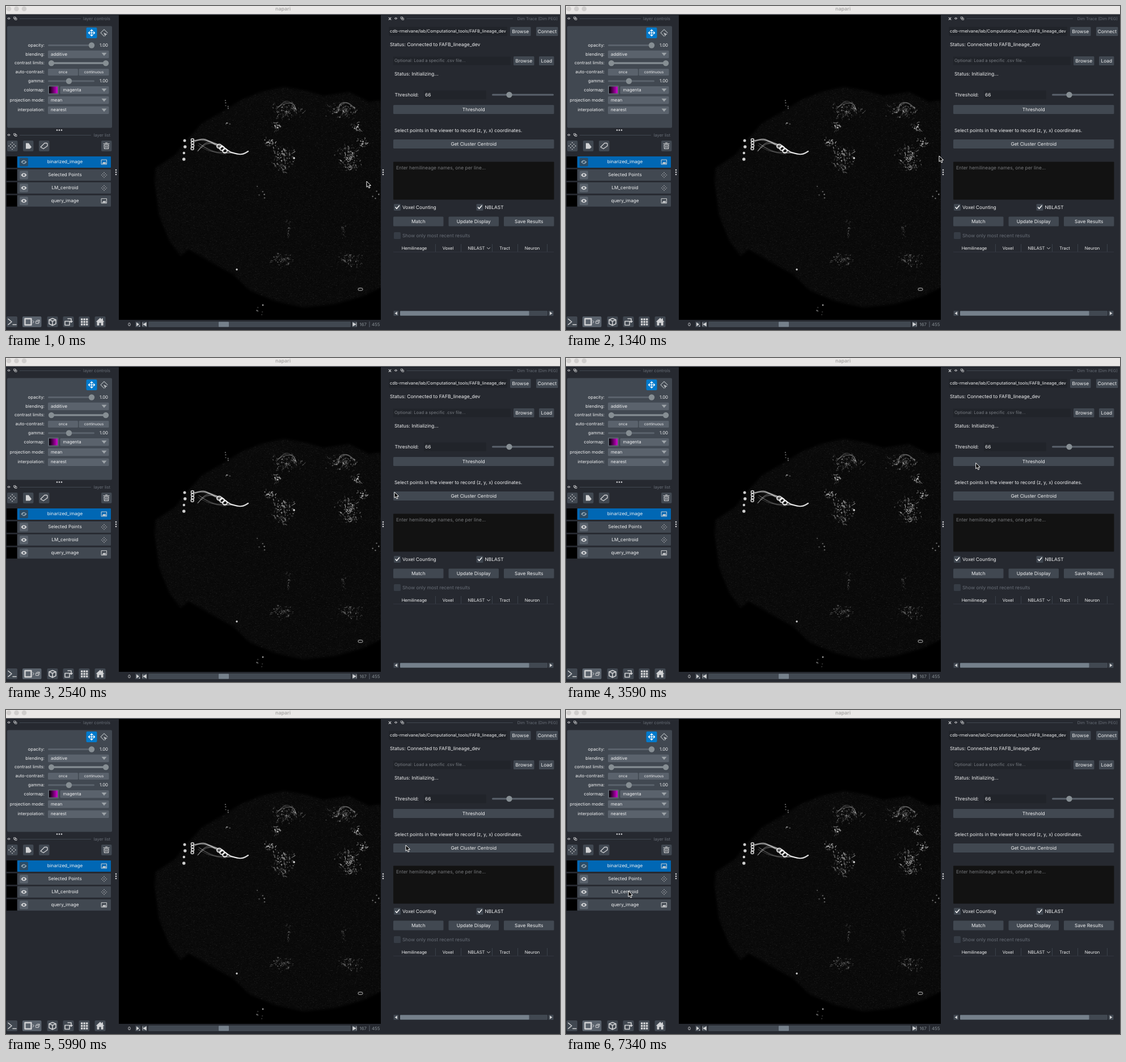
These frames come from a looping animation (977x573 px, 8 s). An HTML page with a canvas:

```html
<!DOCTYPE html>
<html lang="en">
<head>
<meta charset="utf-8">
<title>napari</title>
<style>
html, body { margin: 0; width: 100%; height: 100%; overflow: hidden; background: #262930; }
canvas { display: block; }
</style>
</head>
<body>
<canvas id="stage" width="977" height="573"></canvas>
<script>
const W = 977, H = 573, LOOP = 8000, STEP = 150;
const BG = '#262930', PANEL = '#414851', CONTROL = '#5a626c', KNOB = '#868e93', HANDLE = '#75808b';
const TEXT = '#f0f1f2', DIM = '#686e77', BLUE = '#007acc', ICON = '#d1d2d4', FIELD = '#21242a';

const view = document.getElementById('stage').getContext('2d');
const scene = document.createElement('canvas');
scene.width = W;
scene.height = H;
const c = scene.getContext('2d');

let seed = 7;
const random = () => (seed = (seed * 16807) % 2147483647) / 2147483647;
const spread = size => (random() + random() - 1) * size;
const white = alpha => `rgba(255,255,255,${alpha})`;

function rect(x, y, w, h, color, r = 0) {
  c.fillStyle = color;
  c.beginPath();
  c.roundRect(x, y, w, h, r);
  c.fill();
}

function disc(x, y, r, color) {
  c.fillStyle = color;
  c.beginPath();
  c.arc(x, y, r, 0, 7);
  c.fill();
}

function ring(x, y, rx, ry, color, width = 1) {
  c.strokeStyle = color;
  c.lineWidth = width;
  c.beginPath();
  c.ellipse(x, y, rx, ry, 0, 0, 7);
  c.stroke();
}

function shape(d, x, y, { fill, stroke, width = 1 }) {
  const path = new Path2D(d);
  c.save();
  c.translate(x, y);
  c.lineCap = c.lineJoin = 'round';
  if (fill) { c.fillStyle = fill; c.fill(path); }
  if (stroke) { c.strokeStyle = stroke; c.lineWidth = width; c.stroke(path); }
  c.restore();
}

function text(str, x, y, { size = 8.4, color = TEXT, align = 'left', weight = 400 } = {}) {
  c.font = `${weight} ${size}px Inter, "Liberation Sans", sans-serif`;
  c.textRendering = 'geometricPrecision';
  c.textBaseline = 'middle';
  c.textAlign = align;
  c.fillStyle = color;
  c.fillText(str, x, y);
}

function button(label, x, y, w, h = 16, size = 8.4, color = PANEL) {
  rect(x, y, w, h, color, 1.5);
  text(label, x + w / 2, y + h / 2, { size, align: 'center' });
}

function slider(x, y, w, ...knobs) {
  rect(x, y - 1.5, w, 3, CONTROL, 1.5);
  for (const k of knobs) disc(k, y, 5.2, KNOB);
}

function combo(label, x, y) {
  rect(x, y - 6.5, 181.5 - x, 13.5, CONTROL, 1.5);
  text(label, x + 5, y, { size: 7.8 });
  shape('M-4.5-2.5H4.5L0 3Z', 173, y, { fill: '#9da3a8' });
}

function eye(x, y, size, color, pupil) {
  shape(`M${-size} 0Q0 ${-size * 1.3} ${size} 0Q0 ${size * 1.3} ${-size} 0Z`, x, y, { fill: color });
  disc(x, y, size * .35, pupil);
}

function dockTitle(label, x, y, right, lineEnd, size) {
  eye(x, y, 2.6, ICON, BG);
  shape('M-2-2H1V1H-2ZM0 0H3V3H0Z', x + 11, y - .5, { stroke: ICON, width: .8 });
  rect(x + 19, y, lineEnd - x - 19, 1, PANEL);
  text(label, right, y + .5, { size, color: DIM, align: 'right' });
}

function pointsIcon(x, y, s) {
  disc(x, y, s * .17, ICON);
  for (let i = 0; i < 8; i++) {
    const a = i * Math.PI / 4, r = s * (i % 2 ? .75 : 1.05);
    disc(x + Math.cos(a) * r, y + Math.sin(a) * r, s * .16, ICON);
  }
}

function imageIcon(x, y) {
  shape('M-4.5-4H4.5V4H-4.5Z', x, y, { stroke: ICON });
  shape('M-3.5 3L-1-.5L.5 1L2-1L3.5 3Z', x, y, { fill: ICON });
}

function dots(x, y, dx, dy) {
  for (let i = -1; i < 2; i++) disc(x + i * dx, y + i * dy, 1.3, ICON);
}

// Smooth line through points, drawn several times with random offsets.
function fiber(points, alpha, width = 1, strands = 1, jitter = 0) {
  c.lineCap = 'round';
  c.lineWidth = width;
  c.strokeStyle = white(alpha);
  for (let n = 0; n < strands; n++) {
    const p = points.map(([x, y]) => [x + spread(jitter), y + spread(jitter)]);
    c.beginPath();
    c.moveTo(...p[0]);
    for (let i = 1; i < p.length - 1; i++)
      c.quadraticCurveTo(...p[i], (p[i][0] + p[i + 1][0]) / 2, (p[i][1] + p[i + 1][1]) / 2);
    c.lineTo(...p.at(-1));
    c.stroke();
  }
}

// Cloud of short branches and boutons, densest in the middle.
function tangle(x, y, rx, ry, alpha) {
  for (let i = 0; i < rx * ry * .3 + 8; i++) {
    const px = x + spread(rx * 1.2), py = y + spread(ry * 1.2);
    const hop = () => [px + spread(4), py + spread(4)];
    const glow = alpha * (.15 + random() ** 2 * .85);
    if (random() < .5) fiber([hop(), [px, py], hop()], glow, .6 + random() * .8);
    else disc(px, py, .5 + random() * .9, white(glow));
  }
}

function tissue() {
  const outline = new Path2D('M672 165L640 170L605 152L560 159L530 150L490 143L450 152L415 166L380 188' +
    'L345 208L318 238L298 264L264 286L262 310L270 370L288 415L308 442L322 430L365 455L400 474L430 503' +
    'L475 522L525 533L580 527L630 513L672 492Z');
  c.filter = 'blur(2px)';
  c.fillStyle = '#0a0a0a';
  c.fill(outline);
  c.filter = 'none';
  c.save();
  c.clip(outline);
  for (let i = 0; i < 26000; i++) {
    c.fillStyle = random() < .5 ? white(.035) : 'rgba(0,0,0,.4)';
    c.fillRect(260 + Math.floor(random() * 402), 142 + Math.floor(random() * 392), 1 + random(), 1);
  }
  c.restore();
}

function cellCluster() {
  for (let i = 0; i < 4; i++) {
    disc(315 + spread(2), 238 + i * 11, 2 + random(), white(.8));
    ring(329 + spread(1.5), 237 + i * 5, 2.4, 2.4, white(.75), 1.8);
  }
  fiber([[331, 238], [345, 235], [358, 239], [368, 242], [380, 250]], .35, 1.4, 4, 3);
  fiber([[340, 257], [347, 247], [358, 241], [370, 245]], .25, 1.1, 3, 3);
  fiber([[340, 244], [355, 253], [372, 258], [388, 260]], .2, 1.1, 3, 3);
  for (let i = 0; i < 3; i++) ring(376 + i * 5, 248 + i * 4, 4, 3.5, white(.8), 2.2);
  fiber([[381, 247], [392, 257], [404, 261], [417, 263], [427, 257]], .85, 2.2);
  fiber([[384, 260], [398, 259], [408, 262]], .6, 1.5);
}

function brain() {
  c.save();
  c.beginPath();
  c.rect(199, 16, 462, 539);
  c.clip();
  tissue();
  cellCluster();
  // Arbors mirrored about the midline.
  for (const side of [-1, 1]) {
    const at = (dx, ...rest) => tangle(547 + side * dx, ...rest);
    fiber([[69, 181], [60, 171], [48, 169], [38, 175], [36, 186]].map(([dx, y]) => [547 + side * dx, y]), .25, 1, 3, 4);
    at(48, 184, 27, 15, .4);
    at(71, 213, 8, 9, .8);
    at(82, 242, 9, 8, .75);
    at(57, 264, 20, 17, .55);
    at(60, 284, 14, 9, .4);
    at(48, 396, 3, 16, .3);
    at(61, 449, 20, 13, .35);
  }
  disc(508, 269, 1.7, white(.9));
  disc(407, 466, 1.7, white(.8));
  disc(453, 529, 1.4, white(.6));
  ring(625, 501, 4, 2.2, white(.5), 1.4);
  for (const [x, y] of [[390, 210], [451, 328], [653, 335], [390, 175], [447, 540]])
    for (let i = 0; i < 5; i++) disc(x + spread(9), y + spread(14), 1.2, white(.15 + random() * .3));
  c.restore();
}

function layerControls() {
  dockTitle('layer controls', 5, 22, 184, 132, 7.5);
  rect(2, 35.5, 185, 180, PANEL, 2);
  rect(141.5, 38, 19, 19, BLUE, 2);
  shape('M-5.5 0H5.5M0-5.5V5.5M-3.5-2L-5.5 0L-3.5 2M3.5-2L5.5 0L3.5 2M-2-3.5L0-5.5L2-3.5M-2 3.5L0 5.5L2 3.5',
    151, 47.5, { stroke: '#fff', width: 1.2 });
  shape('M-6 0L0-6L6 0M-6 0L0 6', 173, 47.5, { stroke: '#9da3a8', width: 1.2 });
  shape('M0 0L7 3L4 4L3 7Z', 172, 47, { fill: '#b5b9bd' });

  // The last rows stand slightly further apart.
  const rowY = i => 69.5 + 15.8 * i + Math.max(0, i - 5) * 2;
  ['opacity', 'blending', 'contrast limits', 'auto-contrast', 'gamma', 'colormap', 'projection mode', 'interpolation']
    .forEach((name, i) => text(name + ':', 68, rowY(i), { size: 7.7, align: 'right' }));
  slider(74, rowY(0), 82, 151);
  combo('additive', 74, rowY(1));
  slider(75, rowY(2), 106, 80, 176);
  rect(85, rowY(2) - 1.5, 86, 3, KNOB);
  button('once', 74, rowY(3) - 6, 53, 12, 6.6, CONTROL);
  button('continuous', 128.5, rowY(3) - 6, 53, 12, 6.6, CONTROL);
  slider(74, rowY(4), 82, 111);
  for (const i of [0, 4]) text('1.00', 180, rowY(i), { size: 7.8, align: 'right' });
  const magenta = c.createLinearGradient(76, 0, 91, 0);
  magenta.addColorStop(0, '#000');
  magenta.addColorStop(1, '#d400d4');
  rect(74, rowY(5) - 8, 19, 16, CONTROL, 1.5);
  rect(76, rowY(5) - 6, 15, 12, magenta);
  combo('magenta', 95.5, rowY(5));
  combo('mean', 74, rowY(6));
  combo('nearest', 74, rowY(7));
  dots(94, 219.5, 4, 0);
}

function layerList() {
  dockTitle('layer list', 5, 228, 184, 150, 7.5);
  for (const x of [2, 30, 58, 168]) rect(x, 238, 18.5, 19, PANEL, 2);
  pointsIcon(11, 247.5, 5.5);
  shape('M-4-5L1-5L6 2L3 5L-4 5Z', 39, 247.5, { fill: ICON });
  shape('M-6 2L1-5L5-5L6-4V0L-1 5Z', 67, 247.5, { stroke: ICON, width: 1.3 });
  shape('M-5-4H5M-1.5-5.5H1.5M-4-2L-3.5 5H3.5L4-2ZM-1.3 0V3M1.3 0V3', 177, 247.5, { stroke: ICON, width: 1.2 });

  ['binarized_image', 'Selected Points', 'LM_centroid', 'query_image'].forEach((name, i) => {
    const y = 266 + i * 22.9, mid = y + 10, active = i === 0;
    const box = active ? '#2b4c66' : CONTROL;
    rect(1, y, 18.5, 20, '#000');
    rect(20, y, 165, 20, active ? '#0067b4' : PANEL, 1);
    rect(24, mid - 7.5, 15, 15, box, 2);
    eye(31.5, mid, 5.2, active ? '#8a9eac' : ICON, box);
    if (active) shape('M-4 3L4-3', 31.5, mid, { stroke: box });
    text(name, 104, mid, { size: 8.1, align: 'center' });
    if (i % 3) pointsIcon(173, mid, 4.2);
    else imageIcon(173, mid);
  });
  dots(194, 294, 0, 4);
}

function bottomBar() {
  for (const x of [1, 72.5, 100.5, 128.5, 156.5]) rect(x, 549, 19, 19, PANEL, 2);
  rect(29, 549, 33.5, 19, CONTROL, 2);
  const icon = (d, x, width = 1.6) => shape(d, x, 558.5, { stroke: ICON, width });
  icon('M-7-5L-1 0L-7 5M1 5H7', 11);
  icon('M-5.5-5.5H5.5V5.5H-5.5Z', 39, 2.4);
  icon('M-1.2-2L1 0L-1.2 2', 48.5, 1);
  icon('M-3-1H1V3H-3ZM-3-1L-1-3H3V1L1 3M1-1L3-3', 56, .9);
  icon('M0-6L6-3.5V3.5L0 6.5L-6 3.5V-3.5ZM-6-3.5L0-1L6-3.5M0-1V6', 82);
  icon('M-6-1H2V6H-6ZM-1-5.5H5V1M3-1L5 1L7-1', 110);
  for (let i = 0; i < 9; i++) rect(132 + i % 3 * 4.5, 552.5 + Math.floor(i / 3) * 4.5, 3.4, 3.4, ICON);
  shape('M-7.5 0L0-7L3-4.2V-6H5V-2.3L7.5 0H5.5V6.5H1.6V2H-1.6V6.5H-5.5V0Z', 166, 558.5, { fill: ICON });

  text('0', 217.5, 563.5, { size: 7.8, align: 'center' });
  for (const x of [228, 240, 610]) rect(x, 558, 9, 10, PANEL);
  shape('M-2-3.5L3 0L-2 3.5Z', 232, 563, { fill: ICON });
  disc(235.5, 566, 1, ICON);
  for (const [x, side] of [[244, 1], [615, -1]])
    shape(`M${-3 * side}-3V3M${3 * side}-3L${-2 * side} 0L${3 * side} 3Z`, x, 563, { fill: ICON, stroke: ICON, width: .8 });
  rect(251, 558, 357, 10, PANEL, 1);
  rect(375, 558.5, 18, 9, HANDLE, 1);
  text('167', 636, 563.5, { size: 7.8, color: KNOB, align: 'right' });
  rect(640.5, 558, 1, 10, CONTROL);
  text('455', 645, 563.5, { size: 7.8, color: KNOB });
}

function checkbox(label, x, y, checked) {
  rect(x, y - 6, 12, 12, checked ? PANEL : '#363c45', 1.5);
  if (checked) shape('M-3 0L-1 2.5L3.5-3', x + 6, y, { stroke: '#fff', width: 1.4 });
  text(label, x + 15, y, { color: checked ? TEXT : DIM });
}

function resultTable() {
  const edges = [683, 757, 802, 857, 902, 954];
  ['Hemilineage', 'Voxel', 'NBLAST', 'Tract', 'Neuron'].forEach((name, i) => {
    text(name, (edges[i] + edges[i + 1]) / 2, 428.5, { size: 7.6, align: 'center' });
    rect(edges[i + 1], 421, 1, 14, '#3a4049');
  });
  shape('M-2.5-1.2L0 1.3L2.5-1.2', 851, 428.5, { stroke: ICON });
  rect(683, 434.5, 283, 1, '#323740');
  for (const [x, side] of [[688, 1], [961, -1]]) {
    rect(x - 4.5, 539, 9, 9, PANEL, 1);
    shape(`M${2 * side}-3L${-2.5 * side} 0L${2 * side} 3Z`, x, 543.5, { fill: ICON });
  }
  rect(695, 539, 260, 9, PANEL, 1);
  rect(695, 539.5, 227.5, 8, HANDLE, 1);
}

function matchPanel() {
  dots(665, 294, 0, 4);
  shape('M-1.8-1.8L1.8 1.8M1.8-1.8L-1.8 1.8', 677, 22.5, { stroke: ICON, width: 1.2 });
  dockTitle('Dim Trace (Dim PEG)', 687.5, 22, 973, 894, 7.2);

  rect(675, 37, 209, 15.5, FIELD, 1);
  text('cdb-rmelvane/lab/Computational_tools/FAFB_lineage_dev', 677, 44.5, { size: 7.5 });
  button('Browse', 889, 37, 36.5);
  button('Connect', 935, 37, 38.5);
  text('Status: Connected to FAFB_lineage_dev', 677, 68.5, { size: 8.5 });
  rect(683, 89.5, 207, 15, FIELD, 1);
  text('Optional: Load a specific .csv file...', 685, 97, { size: 7.6, color: '#777b81' });
  button('Browse', 895, 89, 36.5);
  button('Load', 940, 89, 26.5);
  text('Status: Initializing...', 685, 120.5, { size: 8.5 });
  text('Threshold:', 685.5, 157.5);
  rect(737, 149.5, 110, 15.5, FIELD, 1);
  text('66', 739, 157.5);
  slider(857, 157, 109, 887.5);
  button('Threshold', 683, 175, 283.5);
  text('Select points in the viewer to record (z, y, x) coordinates.', 685, 220);
  button('Get Cluster Centroid', 683, 236, 283.5);
  rect(683, 275.5, 283.5, 67, '#121212', 1);
  text('Enter hemilineage names, one per line...', 688, 286.5, { color: '#75777a' });
  checkbox('Voxel Counting', 684, 356, true);
  checkbox('NBLAST', 829.5, 356, true);
  ['Match', 'Update Display', 'Save Results'].forEach((label, i) => button(label, 683 + i * 97.5, 372.5, 88.5, 17));
  checkbox('Show only most recent results', 684, 406, false);
  resultTable();
}

function paintScene() {
  rect(0, 0, W, H, BG);
  rect(0, 0, W, 14.5, '#e9e7e6');
  for (let i = 0; i < 3; i++) disc(5 + i * 13.5, 5, 4.3, '#d0cecd');
  text('napari', 488.5, 5, { size: 8.8, weight: 600, color: '#aaa8a7', align: 'center' });
  rect(199, 16, 462, 539, '#000');
  brain();
  layerControls();
  layerList();
  bottomBar();
  matchPanel();
}

const smooth = p => p * p * (3 - 2 * p);
const settle = p => 1 - (1 - p) ** 2.3;

const moves = [
  { start: 0, steps: 9, to: [658, 265], ease: smooth },
  { start: 10, steps: 7, to: [685, 237], ease: smooth },
  { start: 20, steps: 7, to: [729, 177], ease: settle },
  { start: 33, steps: 5, to: [705, 239], ease: smooth },
  { start: 40, steps: 2, to: [417, 256], ease: smooth },
  { start: 43, steps: 4, to: [110, 320], ease: smooth },
];
const arrow = new Path2D('M0 0V10.3L2.4 8.2L4 12L5.9 11.2L4.3 7.5H7.5Z');

function pointerAt(time) {
  const step = Math.floor((time + 10) / STEP);
  let [x, y] = [636, 310];
  for (const { start, steps, to, ease } of moves) {
    const p = ease(Math.min(1, Math.max(0, (step - start) / steps)));
    x += (to[0] - x) * p;
    y += (to[1] - y) * p;
  }
  return [x, y];
}

function draw() {
  view.drawImage(scene, 0, 0);
  view.save();
  view.translate(...pointerAt(performance.now() % LOOP));
  view.lineJoin = 'round';
  view.fillStyle = '#000';
  view.strokeStyle = '#fff';
  view.fill(arrow);
  view.stroke(arrow);
  view.restore();
  requestAnimationFrame(draw);
}

paintScene();
draw();
</script>
</body>
</html>
```
